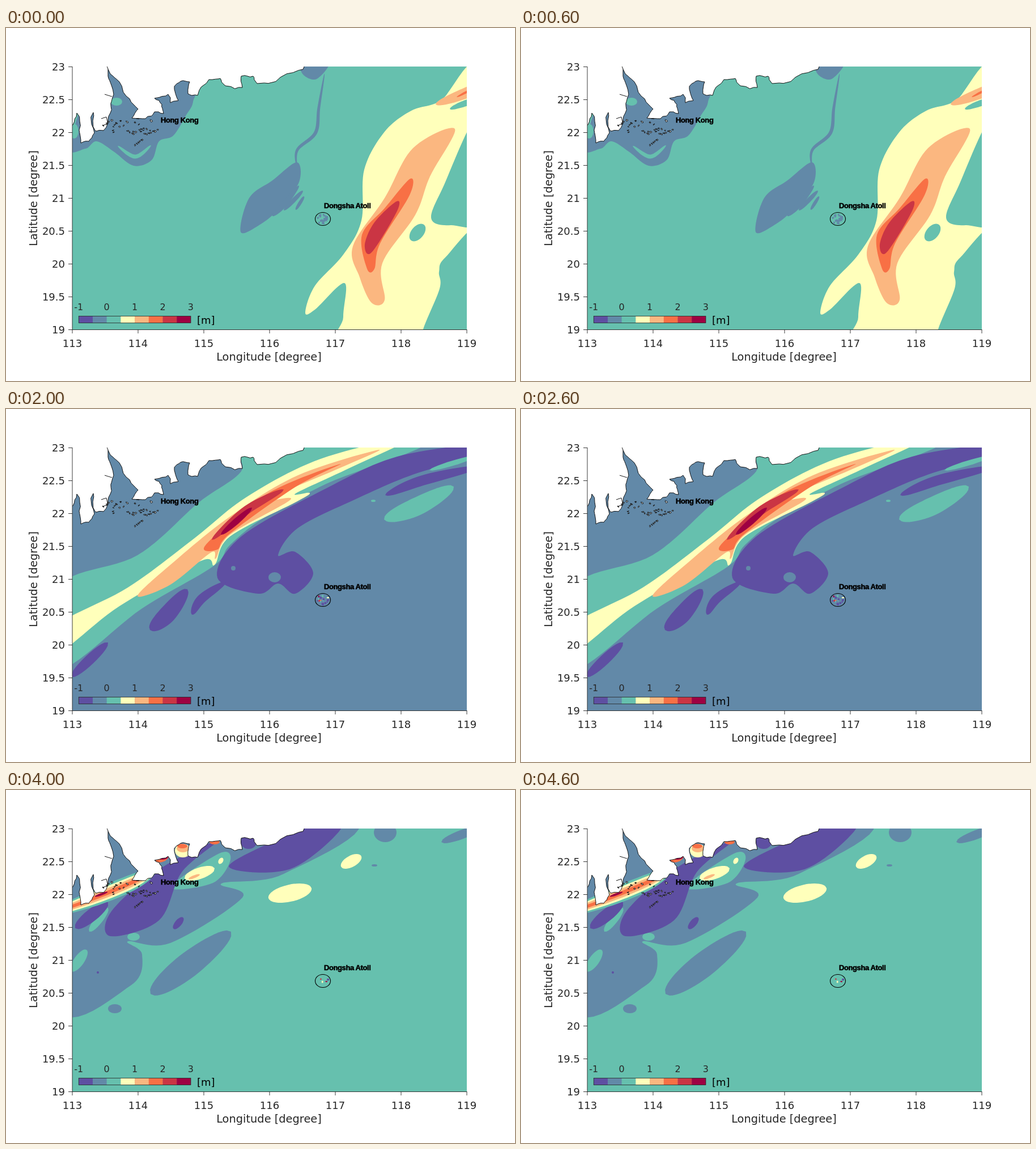
An HTML page that plays this animation: 898 px wide and 623 px high, repeating every 5000 ms.

```html
<!DOCTYPE html>
<html lang="en">
<head>
<meta charset="utf-8">
<title>Sea surface elevation</title>
<style>
html, body { margin: 0; width: 100%; height: 100%; overflow: hidden; background: #fff; }
svg { display: block; width: 898px; height: 623px; font-family: "DejaVu Sans", sans-serif; }
.place { font: bold 13px "Liberation Sans", sans-serif; letter-spacing: -.4px; stroke: #000; stroke-width: .5; }
</style>
</head>
<body>
<svg viewBox="0 0 898 623">
  <clipPath id="plot"><rect x="117" y="68" width="696" height="464.5"/></clipPath>
  <g clip-path="url(#plot)"><g id="sea"></g><g id="land"></g></g>
  <g id="axes"></g>
</svg>
<script>
const colors = { p: '#5e4fa2', b: '#6289a8', g: '#66c0ae', y: '#ffffbb', o: '#fbb780', d: '#f87045', r: '#ca3544', k: '#9e0142' };
const get = id => document.getElementById(id);
let layer;

function add(parent, tag, attrs, text) {
  const el = document.createElementNS('http://www.w3.org/2000/svg', tag);
  for (const key in attrs) el.setAttribute(key, attrs[key]);
  if (text) el.textContent = text;
  return parent.appendChild(el);
}

function randomizer(seed) {
  return () => (seed = (seed * 16807) % 2147483647) / 2147483647;
}

const parse = text => text.split(' ').map(pair => pair.split(',').map(Number));

// Catmull-Rom samples, twelve per segment
function smooth(pts, closed) {
  const n = pts.length, steps = 12, out = [];
  const at = i => closed ? pts[(i + n) % n] : pts[Math.max(0, Math.min(n - 1, i))];
  const count = closed ? n : n - 1;
  for (let i = 0; i < count; i++) {
    const [a, b, c, e] = [at(i - 1), at(i), at(i + 1), at(i + 2)];
    for (let s = 0; s < steps; s++) {
      const t = s / steps;
      out.push(b.map((v, k) => v + t / 2 * (c[k] - a[k]
        + t * (2 * a[k] - 5 * v + 4 * c[k] - e[k] + t * (3 * (v - c[k]) + e[k] - a[k])))));
    }
  }
  return closed ? out : [...out, pts[n - 1]];
}

const fill = (level, pts) => add(layer, 'path', { d: `M${pts.join('L')}Z`, fill: colors[level] });
const area = (level, text) => fill(level, smooth(parse(text), true));

// Ribbon along a spine, tapering to both ends
function lens(level, width, text) {
  const spine = smooth(parse(text)), last = spine.length - 1;
  const side = sign => spine.map(([x, y], i) => {
    const [ax, ay] = spine[Math.max(0, i - 1)], [bx, by] = spine[Math.min(last, i + 1)];
    const half = sign * width / 2 * Math.max(0, Math.sin(Math.PI * i / last)) ** .6 / Math.hypot(bx - ax, by - ay);
    return [x - (by - ay) * half, y + (bx - ax) * half];
  });
  fill(level, [...side(1), ...side(-1).reverse()]);
}

function spot(level, x, y, rx, ry = rx, angle = 0) {
  add(layer, 'ellipse', { rx, ry, fill: colors[level], transform: `translate(${x} ${y}) rotate(${angle})` });
}

function offshore() {
  area('b', '180,60 325,92 330,130 317,155 295,190 270,200 257,233 225,243 190,218 160,200 140,213 112,206');
  spot('g', 120, 182, 8, 13);
  spot('g', 195, 130, 10, 7);
  lens('g', 7, '197,208 228,227 256,207');
  area('b', '522,60 524,82 548,90 570,60');
  lens('b', 6, '562,80 552,140 546,185 514,215 513,245');
  area('b', '513,237 470,269 429,300 414,360 448,347 483,318 517,272');
  lens('b', 10, '470,332 490,312 517,278');
  lens('b', 8, '490,322 524,287');
  lens('b', 6, '511,321 526,297');
  area('y', '840,85 765,130 715,146 668,183 632,250 627,340 595,400 545,455 528,502 545,497 597,450 595,510 600,560 840,560');
  area('g', '845,130 813,184 775,272 750,335 785,348 845,330');
  area('g', '845,352 775,405 764,430 765,460 735,535 740,560 845,560');
  spot('g', 726, 361, 18, 11, -50);
  lens('g', 11, '783,143 813,132 840,125');
  area('o', '792,178 718,212 668,300 612,385 624,440 645,485 668,480 664,415 722,330 748,262');
  area('d', '713,266 668,318 628,365 637,425 650,425 660,380 712,295');
  area('r', '689,306 650,343 633,382 645,396 689,325');
  lens('o', 19, '758,135 813,114 845,98');
  lens('d', 4, '795,122 830,104');
}

function atAtoll() {
  area('b', '90,237 160,236 225,282 290,252 340,180 357,125 320,60 90,60');
  lens('g', 8, '175,225 210,250 250,252 290,226');
  spot('b', 516, 88, 14, 22, 15);
  area('b', '355,313 412,240 455,200 518,148 440,230 430,268');
  area('b', '845,140 750,180 700,235 665,300 553,450 545,570 845,570');
  area('g', '688,545 765,461 830,510 770,550');
  spot('p', 691, 304, 15, 30, 32);
  spot('p', 803, 180, 18, 36, 30);
  area('y', '840,48 735,97 640,145 575,185 543,235 533,305 465,338 348,408 425,384 365,455 338,540 395,560 420,500 475,438 530,392 553,383 553,345 600,325 588,285 590,265 655,190 720,148 840,112');
  lens('y', 26, '627,277 650,225 705,170 850,128');
  lens('g', 14, '750,112 800,94 840,85');
  lens('b', 4, '790,97 825,88');
  area('o', '788,116 690,138 605,190 553,270 543,320 470,360 436,408 510,372 570,310 605,225 685,165 740,128');
  lens('o', 9, '635,159 671,142');
  lens('o', 16, '738,108 790,82 840,62');
  lens('d', 8, '778,95 830,74');
  lens('d', 24, '684,155 605,207 562,285 550,335');
  spot('d', 517, 348, 28, 9, -32);
  lens('r', 14, '592,236 566,280 555,326');
  lens('k', 10, '575,264 559,306');
  spot('r', 516, 348, 3, 2);
  spot('p', 563, 339, 10);
}

function midShelf() {
  area('g', '90,315 232,258 340,165 415,110 430,50 750,50 565,132 455,192 395,240 365,278 240,352 90,460');
  area('p', '840,62 690,84 565,140 415,225 373,298 445,326 480,308 510,326 542,290 510,252 480,258 515,210 615,160 720,115 840,80');
  spot('b', 474, 297, 11, 9);
  spot('b', 401, 281, 4);
  lens('p', 18, '669,152 735,126 835,102');
  lens('p', 30, '254,390 285,362 320,318');
  lens('p', 16, '328,363 345,335 388,305');
  lens('p', 18, '115,473 180,412');
  lens('g', 32, '667,195 725,172 790,137');
  lens('g', 9, '747,108 830,83');
  spot('g', 648, 162, 4, 2);
  area('y', '715,50 555,88 425,155 330,230 215,315 90,382 90,432 200,348 344,268 368,275 395,225 512,164 536,148 511,149 600,107');
  area('o', '658,72 515,117 395,190 290,275 232,330 290,310 362,253 370,264 395,222 502,160 460,160 580,108');
  area('d', '590,97 460,150 353,239 373,248 395,220 510,138');
  lens('r', 15, '490,142 425,178 363,231');
  lens('k', 11, '434,174 379,222');
}

function nearShore() {
  area('g', '845,95 710,130 660,183 566,212 612,255 617,330 556,375 625,440 662,532 680,570 845,570');
  spot('b', 813, 210, 11, 50);
  area('g', '393,420 425,380 515,356 545,378 515,420 440,442');
  lens('g', 36, '358,326 382,280 423,240');
  lens('g', 16, '142,452 197,397');
  spot('g', 245, 294, 6, 9, 20);
  spot('g', 297, 344, 4);
  spot('g', 120, 463, 5);
  spot('g', 559, 130, 25, 5);
  spot('g', 607, 90, 17, 7, -15);
  spot('g', 664, 97, 28, 10, -20);
  spot('g', 672, 145, 6, 3);
  lens('g', 15, '745,78 840,70');
  area('g', '90,230 200,188 270,115 400,70 560,55 430,120 320,182 260,243 232,235 90,312');
  area('p', '626,64 440,120 320,185 257,268 285,285 272,322 303,305 325,230 410,155 570,85');
  lens('p', 26, '177,306 237,245');
  lens('p', 14, '403,185 478,148');
  spot('p', 598, 155, 8, 2);
  area('y', '90,272 225,200 300,145 410,94 510,72 440,113 325,162 262,226 235,218 90,295');
  area('o', '145,262 250,188 340,118 505,76 395,117 310,160 268,211 225,222');
  lens('d', 20, '190,240 260,188 340,126 500,81');
  lens('r', 15, '270,180 340,127 420,100');
  lens('k', 9, '290,164 340,127 418,103');
  spot('k', 461, 95, 13, 5, -12);
  spot('k', 497, 79, 9, 6);
  spot('k', 420, 100, 6, 4);
  spot('r', 235, 200, 7, 3, -45);
}

function ashore() {
  area('b', '90,385 220,345 240,290 215,267 290,270 417,190 380,165 490,148 607,50 90,50');
  area('g', '290,172 376,112 396,123 365,164');
  spot('g', 129, 301, 9, 23, 35);
  lens('g', 14, '147,250 180,208');
  spot('g', 225, 259, 11, 7);
  lens('b', 44, '255,360 320,310 397,250');
  spot('b', 192, 386, 12, 8);
  area('p', '184,258 186,214 270,140 372,90 310,145 270,230');
  area('p', '393,135 490,82 560,55 590,70 500,140');
  spot('p', 428, 92, 14, 12);
  lens('p', 22, '122,244 180,198');
  spot('p', 304, 235, 6, 13, 40);
  spot('p', 162, 322, 2);
  spot('y', 501, 182, 39, 15, -13);
  spot('y', 609, 126, 20, 10, -28);
  spot('b', 669, 75, 20, 17);
  lens('b', 16, '768,92 840,65');
  spot('b', 650, 133, 5, 2);
  lens('y', 20, '315,156 368,138');
  lens('o', 5, '322,157 342,149');
  spot('y', 379, 125, 4, 6, 30);
  const surge = { g: 30, y: 22, o: 15, d: 7 };
  for (const level in surge) lens(level, surge[level], '70,222 150,193 225,162 265,140');
  spot('k', 234, 155, 11, 4, -20);
  spot('k', 168, 184, 12, 2, -20);
  spot('y', 312, 107, 14, 12);
  spot('o', 312, 103, 11, 7);
  spot('d', 311, 99, 9, 4);
  spot('d', 275, 120, 12, 7, -20);
  spot('k', 276, 118, 10, 5);
  spot('d', 368, 92, 9, 4);
  spot('r', 267, 144, 4);
}

// Each scene: drawing rule, open-sea level, levels scattered inside the atoll
const scenes = [
  [offshore, 'g', 'bbbbbbbbbbbbbbbbbbbbbbbbbbbbbb'],
  [atAtoll, 'b', 'rkrydrprkbprrkrbypr', true],
  [midShelf, 'b', 'pgpbpkppgprpppygppdpgp'],
  [nearShore, 'b', 'ggggggggggrpgggrggpgkg'],
  [ashore, 'g', 'gggggrgpgggkggyggg']
];

function drawScene([draw, base, atoll, rim], index) {
  layer = add(get('sea'), 'g', {});
  const group = layer, random = randomizer(71 + index * 97);
  add(group, 'rect', { x: 117, y: 68, width: 696, height: 465, fill: colors[rim ? 'g' : base] });
  draw();
  if (rim) spot('g', 558, 337, 12, 10);
  for (const level of atoll) {
    const angle = random() * 2 * Math.PI, reach = rim ? .95 : Math.sqrt(random()) * .85;
    add(group, 'rect', { x: 557.5 + 12 * reach * Math.cos(angle), y: 335.5 + 10 * reach * Math.sin(angle),
      width: 2 + random() * 2, height: 2 + random() * 2, fill: colors[level] });
  }
  return group;
}

function drawLand() {
  const land = get('land'), random = randomizer(42);
  const ink = { fill: '#fff', stroke: '#000', 'stroke-width': .9 };
  const jitter = size => (random() - .5) * size;
  const roughen = pts => pts.flatMap(([x, y], i) => {
    const [nx, ny] = pts[(i + 1) % pts.length];
    const size = Math.hypot(nx - x, ny - y);
    const shift = size > 60 ? 0 : size * .28;
    return [[x, y], [(x + nx) / 2 + jitter(shift), (y + ny) / 2 + jitter(shift)]];
  });
  const shore = text => add(land, 'path', { d: `M${roughen(roughen(parse(text))).join('L')}Z`, ...ink });
  shore('100,50 178,50 180,85 187,104 186,130 184,150 180,164 172,181 158,182 154,149 156,185 146,200 132,203 129,180 125,150 118,171 100,180');
  shore('179,50 527,50 524,73 484,87 443,98 436,85 415,85 417,105 387,102 378,89 358,91 338,119 321,116 324,95 308,94 297,103 304,128 290,132 286,117 262,124 275,135 278,151 262,148 246,160 222,159 233,143 212,120 200,95 184,81');

  const islet = (x, y, size) => add(land, 'path', {
    d: `M${x},${y}l${size},${jitter(3)}l${jitter(2)},${1 + random()}l${-size * .7},${jitter(2)}z`, ...ink });
  for (let i = 0; i < 34; i++) islet(168 + random() * 88, 160 + random() * 28, 1 + random() * 3);
  for (let i = 0; i < 6; i++) {
    islet(246 + i * 4, 187 - i * 1.6, 3);
    islet(227 + i * 2.6, 205 - i * 1.8, 2);
  }
  add(land, 'path', { d: 'M174,117L187,121M168,160L177,157L180,169L170,172', ...ink, fill: 'none' });
  add(land, 'ellipse', { cx: 559, cy: 337, rx: 13.5, ry: 11.5, ...ink, fill: 'none', 'stroke-width': 1.1 });
  add(land, 'text', { x: 273, y: 166.5, class: 'place' }, 'Hong Kong');
  add(land, 'text', { x: 561, y: 317.5, class: 'place' }, 'Dongsha Atoll');
}

function drawAxes() {
  const axes = get('axes'), dark = '#262626';
  const label = (x, y, text, size = 18, anchor = 'middle', more = {}) =>
    add(axes, 'text', { x, y, 'font-size': size, 'text-anchor': anchor, fill: dark, ...more }, text);
  let d = 'M117,68V532.5H813';
  for (let i = 0; i <= 8; i++) {
    d += `M110,${68.5 + 58 * i}h7`;
    label(104, 75 + 58 * i, String(23 - i / 2), 18, 'end');
  }
  for (let i = 0; i <= 6; i++) {
    d += `M${117 + 116 * i},532v7`;
    label(117 + 116 * i, 562.5, String(113 + i));
  }
  add(axes, 'path', { d, fill: 'none', stroke: dark, 'stroke-width': .9 });
  label(464, 587, 'Longitude [degree]', 19.4);
  label(0, 0, 'Latitude [degree]', 19.4, 'middle', { transform: 'translate(54.5 300.5) rotate(-90)' });

  const bar = { x: 128.3, y: 508.5, height: 12 };
  Object.values(colors).forEach((fill, i) =>
    add(axes, 'rect', { ...bar, x: bar.x + i * 24.7, width: 24.9, fill }));
  add(axes, 'rect', { ...bar, width: 197.6, fill: 'none', stroke: dark, 'stroke-width': .8 });
  for (let i = 0; i < 5; i++) label(bar.x + i * 49.4, 498, String(i - 1), 16);
  label(337, 522, '[m]', 18, 'start', { fill: '#000' });
}

const layers = scenes.map(drawScene);
drawLand();
drawAxes();

function show() {
  const current = Math.floor(performance.now() / 1000) % layers.length;
  layers.forEach((group, i) => group.style.display = i === current ? '' : 'none');
  requestAnimationFrame(show);
}
show();
</script>
</body>
</html>
```
